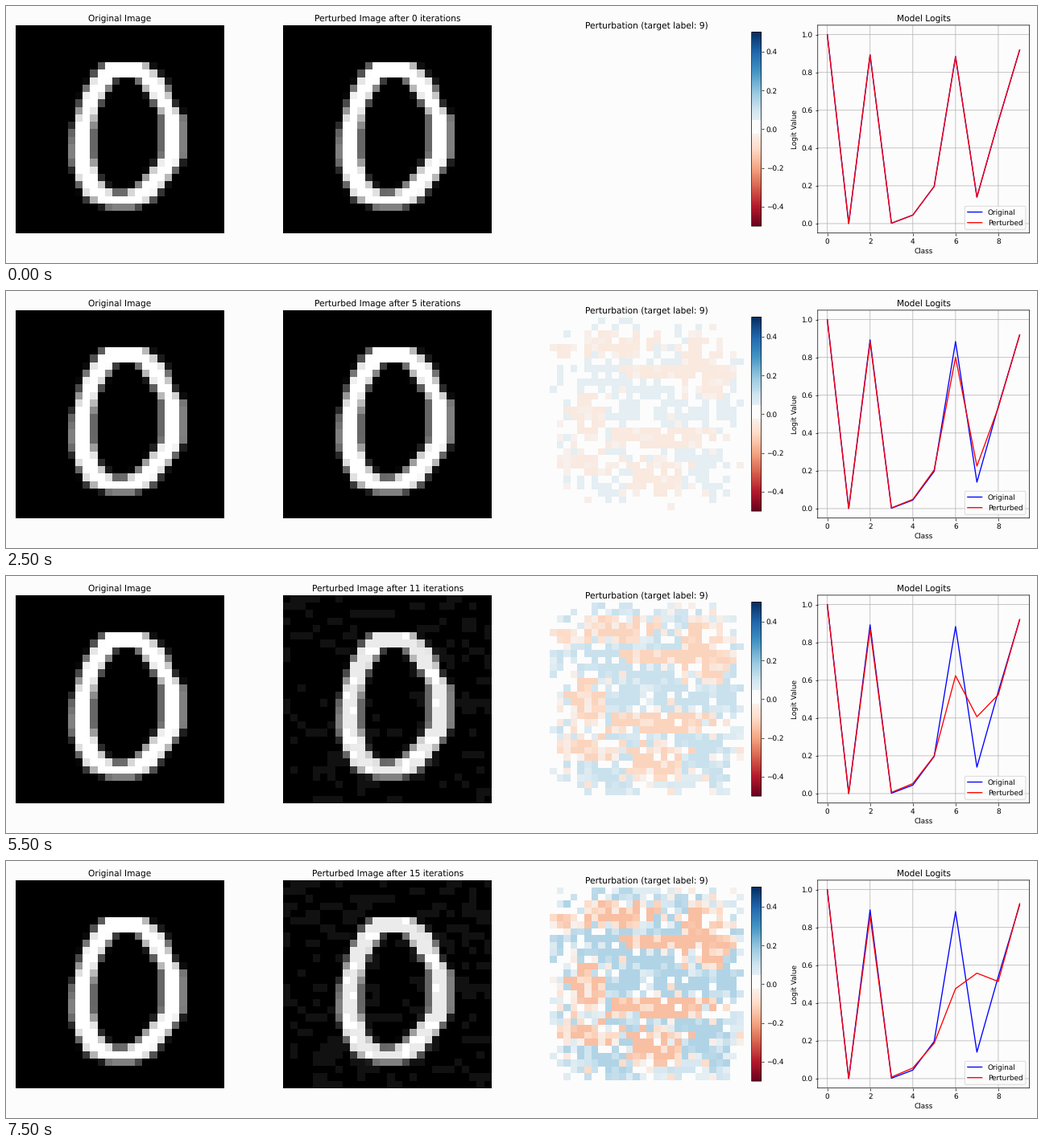
Write a matplotlib script that moves like this. It is 1280 px wide and 320 px high and loops after 8000 ms.

```python
import numpy as np
import matplotlib.pyplot as plt
from matplotlib.animation import FuncAnimation
from matplotlib.colors import ListedColormap
from matplotlib.path import Path

N = 28
STEPS = 16
PAPER = "#fcfcfc"

plt.rcParams.update({
    "font.family": "DejaVu Sans",
    "figure.facecolor": PAPER,
    "axes.facecolor": PAPER,
    "path.snap": False,
})

# Key points of the handwritten zero, in cell units
OUTER = [(12.2, 5), (17.2, 5), (20.1, 7.5), (21.1, 10.5), (22.5, 12.3),
         (22.55, 17.8), (20.8, 20.4), (18.4, 23.5), (16, 24.5), (12.6, 24.55),
         (9.5, 23.3), (8.1, 20.5), (7.45, 18), (7.6, 14.3), (9, 9.5), (10.6, 6.5)]
INNER = [(13.6, 7), (16.2, 7), (18, 9.5), (19.6, 12), (19.64, 17.6),
         (16.6, 21.5), (14.8, 22.55), (13.1, 22.55), (11.3, 21), (10.35, 17.5),
         (10.4, 14.3), (11, 11), (12.5, 8.5)]

# Soft patches pushed down: centre x, y and radius x, y
PATCHES = [(1, 5, 2, 1.5), (9, 4, 5, 1.8), (22, 7, 3.5, 5), (14, 8, 5, 1.2),
           (5, 14, 2.5, 4), (16, 17.5, 8, 1.6), (5, 21.5, 5, 1.7), (15, 23.5, 4, 2.5)]


def draw_zero(sub=10):
    """Area coverage of the ring in each cell."""
    t = (np.arange(N * sub) + 0.5) / sub
    pts = np.stack(np.meshgrid(t, t), -1).reshape(-1, 2)
    ring = Path(OUTER).contains_points(pts) & ~Path(INNER).contains_points(pts)
    return ring.reshape(N, sub, N, sub).mean(axis=(1, 3))


def push_field(rng):
    """Signed strength of the push on each cell, from -1 to 1."""
    y, x = np.mgrid[:N, :N] + 0.5
    f = np.ones((N, N))
    for cx, cy, rx, ry in PATCHES:
        f -= 2.2 * np.exp(-((x - cx) / rx) ** 4 - ((y - cy) / ry) ** 4)
    f = np.clip(f, -1, 1) + rng.normal(0, 0.75, (N, N))
    u = np.abs(np.linspace(-1, 1, N)) ** 5
    rim = 1.5 - (u[:, None] + u) + rng.uniform(-0.5, 0.5, (N, N))
    return np.clip(1.4 * f, -1, 1) * np.clip(rim, 0, 1)


def patchy(rng):
    """Evenly spread values from 0 to 1 that clump along rows."""
    noise = rng.normal(size=(N, N))
    noise += 0.9 * np.roll(noise, 1, axis=1)
    return noise.ravel().argsort().argsort().reshape(N, N) / N**2


def soft_rdbu():
    """RdBu with a blank band around zero."""
    colors = plt.get_cmap("RdBu")(np.arange(256))
    v = (np.arange(256) + 0.5) / 256 - 0.5
    colors[(v > -0.02) & (v < 0.045)] = (0.99, 0.99, 0.99, 1)
    return ListedColormap(colors)


rng = np.random.default_rng(7)
zero = draw_zero()
push = push_field(rng)
grain = patchy(rng)


def perturbed(n):
    img = zero.copy()
    if n >= 10:
        img[(zero > 0.92) & (grain < 0.7)] = 0.92
        img[(zero < 0.05) & (grain < 0.02 * n)] = 0.07
    return img


def perturbation(n):
    return 0.01 * np.round(n * push)


BASE = np.array([1, 0.0005, 0.893, 0.002, 0.045, 0.197, 0.884, 0.14, 0.54, 0.919])


def logits(n):
    t = n / (STEPS - 1)
    y = BASE.copy()
    y[2:5] += np.array([-0.033, 0.006, 0.011]) * t
    y[5] += 0.04 * t - 0.05 * t**2
    y[6:9] += np.array([-0.408, 0.418, -0.026]) * t**1.45
    y[9] += 0.007 * t**3
    return y


def after(n):
    return f"Perturbed Image after {n} iterations"


fig, (ax_orig, ax_pert, ax_diff, ax_log) = plt.subplots(
    1, 4, figsize=(20, 5), dpi=64)

gray = dict(cmap="gray", vmin=0, vmax=1, interpolation="nearest")
ax_orig.imshow(zero, **gray)
ax_orig.set_title("Original Image")
im_pert = ax_pert.imshow(zero, **gray)
title = ax_pert.set_title(after(0))
im_diff = ax_diff.imshow(perturbation(0), cmap=soft_rdbu(), vmin=-0.5, vmax=0.5,
                         interpolation="nearest")
ax_diff.set_title("Perturbation (target label: 9)")
for ax in (ax_orig, ax_pert, ax_diff):
    ax.axis("off")
fig.colorbar(im_diff, ax=ax_diff, fraction=0.046, pad=0.04)

ax_log.plot(BASE, color="blue", label="Original")
line, = ax_log.plot(BASE, color="red", label="Perturbed")
ax_log.set_title("Model Logits")
ax_log.set_xlabel("Class")
ax_log.set_ylabel("Logit Value")
ax_log.set_ylim(-0.05, 1.05)
ax_log.grid(True)
ax_log.legend(loc="lower right")

# Lay out at a finer resolution, then draw with unhinted text
fig.dpi = 100
fig.tight_layout()
fig.dpi = 64
plt.rcParams["text.hinting"] = "none"


def update(n):
    im_pert.set_data(perturbed(n))
    im_diff.set_data(perturbation(n))
    title.set_text(after(n))
    line.set_ydata(logits(n))
    return im_pert, im_diff, title, line


anim = FuncAnimation(fig, update, frames=STEPS, interval=500,
                     repeat=True, repeat_delay=0, blit=False)
plt.show()
```
